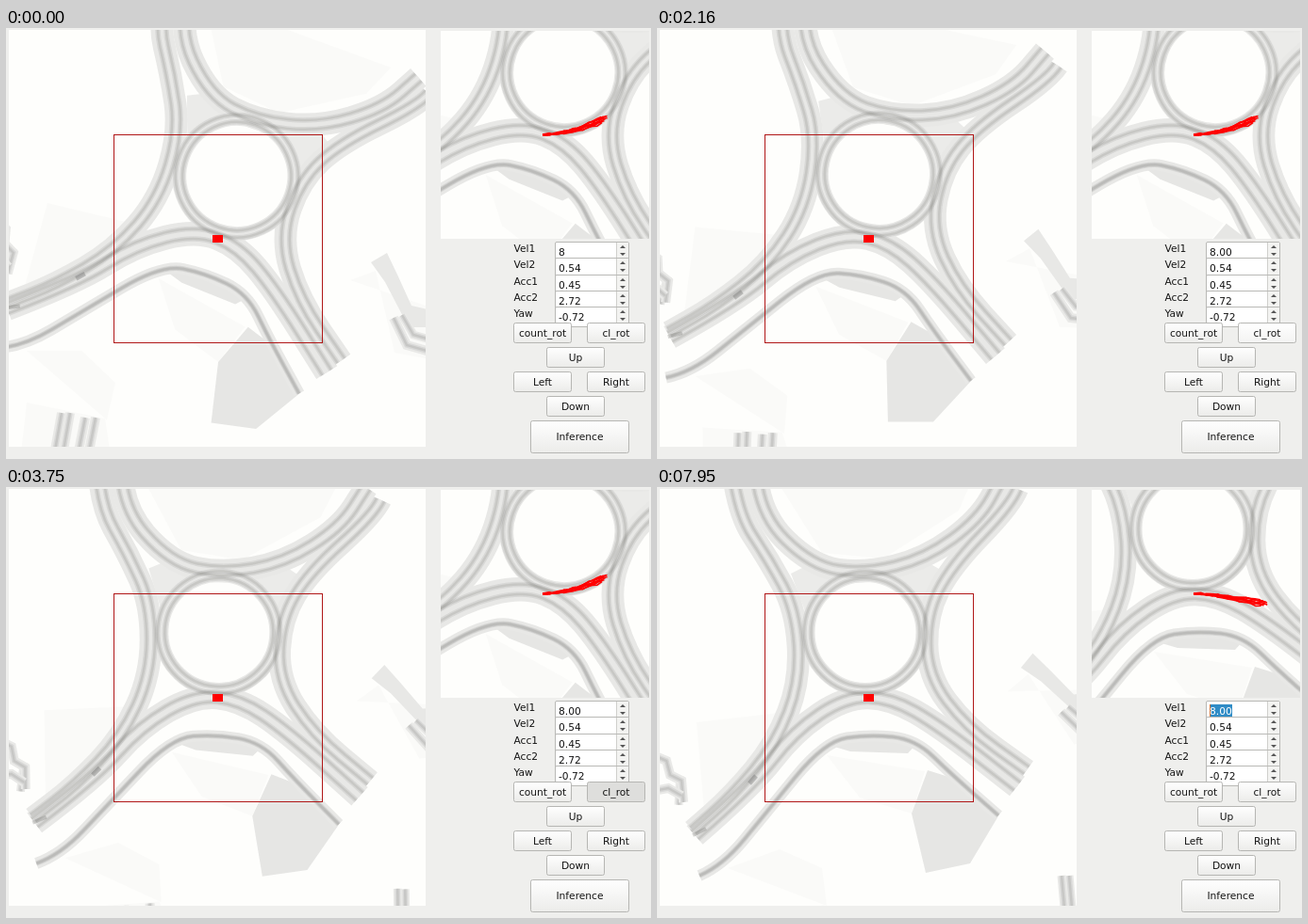
An HTML page with a canvas for the animation above (8000 ms loop, 684 px wide and 458 px high).

```html
<!DOCTYPE html>
<html lang="en">
<head>
<meta charset="utf-8">
<title>Trajectory panel</title>
<style>
  html, body { margin: 0; width: 100%; height: 100%; overflow: hidden; background: #efefed; }
  #stage { position: relative; width: 684px; height: 458px; overflow: hidden; background: #efefed;
    font: 10.67px "DejaVu Sans", sans-serif; color: #141414; }
  #stage > *, .spin > * { position: absolute; box-sizing: border-box; }
  #map { left: 3px; top: 2px; }
  #inset { left: 461px; top: 3px; }
  #area { left: 114px; top: 113px; width: 222px; height: 222px; border: 1px solid #b01717; }
  #car { left: 219px; top: 220px; width: 11px; height: 8px; background: #f00; }
  .label { left: 538.5px; line-height: 14px; }
  .spin { left: 582px; width: 79px; height: 22px; background: #fff; border: 1px solid #b9b9b6; border-radius: 2px; }
  .spin .value { left: 3px; top: 3px; height: 15px; line-height: 15px; white-space: pre; }
  .spin .steps { right: 0; top: 0; width: 13px; height: 20px; background: #f3f3f1; border-left: 1px solid #d0d0cd; }
  .steps::before, .steps::after { content: ""; position: absolute; left: 3px; border: 3px solid transparent; }
  .steps::before { top: 3px; border-bottom-color: #555; border-top-width: 0; }
  .steps::after { top: 11px; border-top-color: #555; border-bottom-width: 0; }
  .selected { display: inline-block; height: 15px; background: #308cc6; color: #fff; }
  #caret { left: 3px; top: 3px; width: 1px; height: 15px; background: #cf7339; }
  .button { display: flex; align-items: center; justify-content: center; border: 1px solid #b6b6b3;
    border-radius: 2.5px; background: linear-gradient(#fefefe, #ececea); }
  .button.hover { background: linear-gradient(#fff, #f3f3f2); }
  .button.press { background: #dededc; }
</style>
</head>
<body>
<div id="stage">
  <canvas id="map" width="442" height="443"></canvas>
  <canvas id="inset" width="221" height="221"></canvas>
  <div id="area"></div>
  <div id="car"></div>
</div>
<script>
const LOOP = 8000;
const PIVOT = [224.5, 223.5];
const TILT = 20, STEP = 4;
const stage = document.getElementById('stage');
const mapCtx = document.getElementById('map').getContext('2d');
const insetCtx = document.getElementById('inset').getContext('2d');

// Road centre lines as flat x, y lists, in the pose after the last turn
const west = [79,-30, 84,25, 119,78, 147,130, 152,205, 126,273, 80,328, 38,365];
const north = [105,-20, 107,27, 164,84, 220,92, 285,76, 342,34, 366,-10];
const east = [382,2, 376,18, 312,84, 286,135, 287,200, 328,255, 392,301];
const south = [40,370, 100,318, 145,260, 200,223, 248,224, 300,254, 382,318];
const outer = [45,413, 70,402, 115,347, 178,270, 225,263, 274,268, 312,305, 362,349];

function parallel(p, gap) {
  const result = [];
  for (let i = 0; i < p.length; i += 2) {
    const a = Math.max(0, i - 2), b = Math.min(p.length - 2, i + 2);
    const dx = p[b] - p[a], dy = p[b + 1] - p[a + 1], length = Math.hypot(dx, dy);
    result.push(p[i] - dy / length * gap, p[i + 1] + dx / length * gap);
  }
  return result;
}
const pair = (road, gap) => [parallel(road, -gap), parallel(road, gap)];
const lanes = [...pair(west, 4.5), ...pair(north, 5), ...pair(east, 4.5), ...pair(south, 5.5)];

function trace(ctx, p, smooth) {
  ctx.beginPath();
  ctx.moveTo(p[0], p[1]);
  for (let i = 2; i < p.length - 2; i += 2) {
    if (smooth) ctx.quadraticCurveTo(p[i], p[i + 1], (p[i] + p[i + 2]) / 2, (p[i + 1] + p[i + 3]) / 2);
    else ctx.lineTo(p[i], p[i + 1]);
  }
  ctx.lineTo(p[p.length - 2], p[p.length - 1]);
}
function fill(ctx, color, p) {
  trace(ctx, p);
  ctx.fillStyle = color;
  ctx.fill();
}
function stroke(ctx, color, width) {
  ctx.strokeStyle = color;
  ctx.lineWidth = width;
  ctx.stroke();
}
function mark(ctx) {
  stroke(ctx, 'rgba(110,110,106,.13)', 5.5);
  stroke(ctx, 'rgba(110,110,106,.16)', 2.5);
}
function strip(ctx, p, width) {
  trace(ctx, p);
  stroke(ctx, '#e9e9e7', width);
  mark(ctx);
}
function ring(ctx, r) {
  ctx.beginPath();
  ctx.arc(221, 154.5, r, 0, 2 * Math.PI);
}
function turn(ctx, angle) {
  ctx.rotate(angle * Math.PI / 180);
  ctx.translate(-PIVOT[0], -PIVOT[1]);
}

// Parts placed in the starting pose
function drawOutskirts(ctx) {
  ctx.save();
  ctx.translate(...PIVOT);
  turn(ctx, -TILT);
  fill(ctx, '#fafaf8', [22,398, 105,415, 112,460, 15,460]);
  fill(ctx, '#fafaf8', [365,268, 392,258, 412,345, 450,352, 460,300]);
  fill(ctx, '#e8e8e6', [387,249, 404,239, 415,262, 430,295, 456,301, 456,318, 427,318, 402,270]);
  strip(ctx, [411,308, 425,337, 460,347], 10);
  strip(ctx, [420,305, 432,326, 460,334], 9);
  for (const x of [59, 68, 84, 95]) strip(ctx, [x,x < 75 ? 409 : 414, x - 9,460], 10);
  strip(ctx, [-4,262, 8,234], 9);
  ctx.restore();
}

function drawMap(ctx, left, top, angle) {
  ctx.setTransform(1, 0, 0, 1, 0, 0);
  ctx.filter = 'none';
  ctx.fillStyle = '#fefefc';
  ctx.fillRect(0, 0, 442, 443);
  ctx.translate(PIVOT[0] - left, PIVOT[1] - top);
  turn(ctx, angle);
  ctx.filter = 'blur(0.7px)';

  fill(ctx, '#fafaf8', [125,-10, 175,70, 240,76, 320,25, 335,-10]);
  fill(ctx, '#fafaf8', [42,250, 130,240, 108,284, 50,345]);
  fill(ctx, '#fafaf8', [75,405, 130,385, 175,405, 180,445]);
  fill(ctx, '#fafaf8', [180,285, 284,302, 270,347, 215,330]);
  drawOutskirts(ctx);
  strip(ctx, [-4,285, 10,291, 14,306, 26,312, 28,335], 10);
  strip(ctx, [-4,323, 12,320, 26,328], 10);
  for (const x of [429, 437]) strip(ctx, [x,413, x + 5,470], 9);
  fill(ctx, '#e6e6e4', [287,301, 322,312, 363,348, 332,400, 285,410, 270,347]);
  fill(ctx, '#e6e6e4', [178,273, 205,281, 266,283, 277,271, 203,263]);
  fill(ctx, '#ebebe9', [142,92, 162,82, 198,90, 157,132]);
  fill(ctx, '#ebebe9', [240,90, 287,80, 304,90, 288,130]);

  for (const lane of lanes) {
    trace(ctx, lane, true);
    stroke(ctx, '#e8e8e6', 15);
  }
  trace(ctx, outer, true);
  stroke(ctx, '#e8e8e6', 12);
  ring(ctx, 61);
  stroke(ctx, '#e8e8e6', 15);
  for (const lane of [...lanes, outer]) {
    trace(ctx, lane, true);
    mark(ctx);
  }
  stroke(ctx, 'rgba(110,110,106,.12)', 4);
  for (const r of [57.5, 65]) {
    ring(ctx, r);
    mark(ctx);
  }
  trace(ctx, [98,315, 105,307]);
  stroke(ctx, 'rgba(90,90,88,.3)', 5);
  trace(ctx, [38,370, 52,363]);
  stroke(ctx, 'rgba(90,90,88,.25)', 4);
}

// A fan of predicted paths starting at the car
function drawPaths(dx, dy, bend, spread) {
  const ctx = insetCtx;
  ctx.setTransform(1, 0, 0, 1, 0, 0);
  ctx.filter = 'none';
  let seed = 7;
  const random = () => (seed = seed * 16807 % 2147483647) / 2147483647;
  for (let n = 0; n < 9; n++) {
    const side = n / 4 - 1, reach = 0.86 + 0.14 * random();
    const points = [108, 110];
    for (let k = 1; k <= 12; k++) {
      const t = k / 12 * reach;
      points.push(110 + dx * t,
        110 + dy * t ** bend + spread * side * t ** 1.5 + (random() - 0.5) * 2.4);
    }
    trace(ctx, points);
    stroke(ctx, '#f00', 1.5);
  }
  ctx.fillStyle = '#f00';
  ctx.fillRect(108, 109, 6, 3);
}

function add(parent, className, style, text = '') {
  const el = document.createElement('div');
  el.className = className;
  el.textContent = text;
  for (const key in style) el.style[key] = style[key] + 'px';
  parent.append(el);
  return el;
}

const fields = [['Vel1', '8'], ['Vel2', '0.54'], ['Acc1', '0.45'], ['Acc2', '2.72'], ['Yaw', '-0.72']];
const spins = fields.map(([name, value], i) => {
  const y = Math.round(i * 17.3);
  add(stage, 'label', { top: 228 + y }, name);
  const spin = add(stage, 'spin', { top: 227 + y });
  add(spin, 'steps', {});
  return add(spin, 'value', {}, value);
});
const vel = spins[0];
const caret = add(vel.parentNode, '', {});
caret.id = 'caret';

const buttons = {};
function addButton(name, left, top, width = 62, height = 22) {
  buttons[name] = add(stage, 'button', { left, top, width, height }, name);
}
addButton('count_rot', 538, 313);
addButton('cl_rot', 616, 313);
addButton('Up', 573, 339);
addButton('Left', 538, 365);
addButton('Right', 616, 365);
addButton('Down', 573, 391);
addButton('Inference', 556, 417, 105, 35);

const presses = [[1350, 1470], [2070, 2160], [2580, 2700], [3210, 3300], [3660, 3810]];
const pointer = [[0, ''], [630, 'count_rot'], [720, ''], [810, 'cl_rot'], [4050, 'Up'], [4110, 'Right'],
  [4200, 'Inference'], [6780, ''], [7680, 'count_rot'], [7770, 'Up'], [7860, 'Down'], [7950, '']];
const selectTimes = [6780, 6840, 6890, 6930];
const passed = (times, t) => times.filter(time => t >= time).length;

let shownAngle, shownInset, shownText;

function showValue(t) {
  const value = t < 1350 ? '8' : '8.00';
  const count = passed(selectTimes, t);
  const key = value + '/' + count;
  if (key !== shownText) {
    shownText = key;
    vel.textContent = value.slice(0, value.length - count);
    if (count) {
      const selection = document.createElement('span');
      selection.className = 'selected';
      selection.textContent = value.slice(-count);
      vel.append(selection);
    }
  }
  caret.hidden = t < 6930 || (t >= 7290 && t < 7680);
}

function showButtons(t) {
  const hover = pointer[passed(pointer.map(p => p[0]), t) - 1][1];
  const pressed = presses.some(([from, to]) => t >= from && t < to) || (t >= 4650 && t < 4770);
  for (const name in buttons) {
    buttons[name].className = 'button' + (name === hover ? (pressed ? ' press' : ' hover') : '');
  }
}

function showMaps(t) {
  const angle = TILT - STEP * passed(presses.map(p => p[1]), t);
  if (angle !== shownAngle) drawMap(mapCtx, 3, 2, shownAngle = angle);
  const inset = t < 5700 ? TILT : 0;
  if (inset !== shownInset) {
    drawMap(insetCtx, 114, 113, shownInset = inset);
    if (inset) drawPaths(70, -20, 1.8, 5);
    else drawPaths(80, 12, 1.3, 5);
  }
}

function frame() {
  const t = performance.now() % LOOP;
  showMaps(t);
  showValue(t);
  showButtons(t);
  requestAnimationFrame(frame);
}
frame();
</script>
</body>
</html>
```
